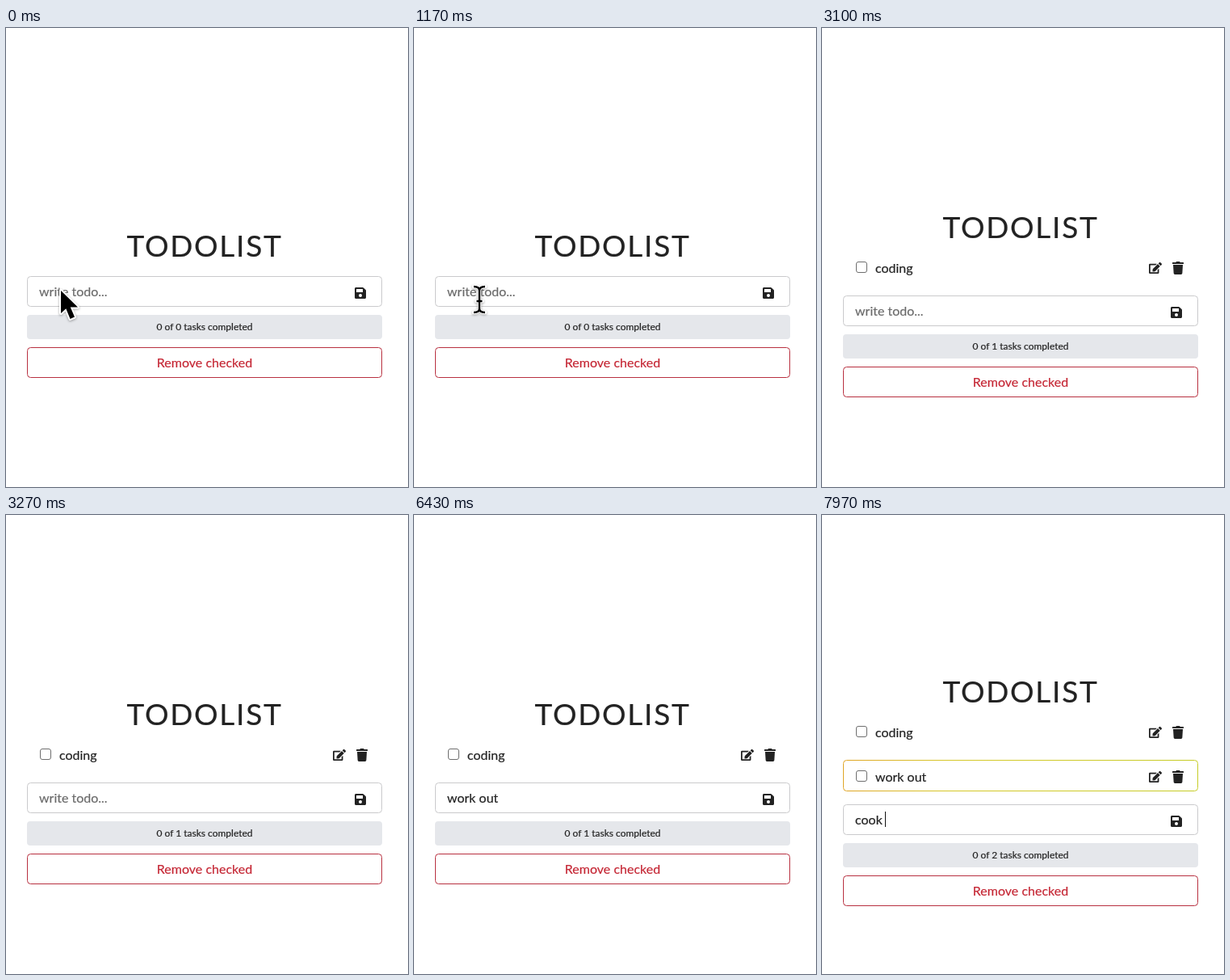
An HTML page that plays this animation: 498 by 568 pixels, repeating every 8 s.

```html
<!DOCTYPE html>
<html lang="en">
<head>
<meta charset="utf-8">
<title>Todolist</title>
<style>
  html, body { margin: 0; width: 100%; height: 100%; overflow: hidden; background: #fff; }
  svg { display: block; }
  text { font: 16px Lato, sans-serif; white-space: pre; fill: #222; stroke: #222; stroke-width: .2px; }
  .title { font-size: 37px; letter-spacing: 1.7px; }
  .small { font-size: 12px; }
  .mid { text-anchor: middle; }
  .hint { fill: #6b6b6b; stroke: #6b6b6b; }
  .red { fill: #c52735; stroke: #c52735; }
  .icon { fill: #222; }
  .line { fill: none; stroke-width: 1px; }
  .halo { fill: none; stroke: #fff; stroke-linejoin: round; stroke-linecap: round; }
  #pointer { filter: drop-shadow(0 1.5px 1.5px rgba(0, 0, 0, .35)); }
</style>
</head>
<body>
<svg width="498" height="568" viewBox="0 0 498 568">
  <defs>
    <linearGradient id="glow">
      <stop offset="0" stop-color="#e0a526"/>
      <stop offset=".3" stop-color="#d6c828"/>
      <stop offset="1" stop-color="#c6cc26"/>
    </linearGradient>
    <path id="save" transform="scale(.03125)" d="M433.9 129.9l-83.8-83.8A48 48 0 0 0 316.1 32H48C21.5 32 0 53.5 0 80v352c0 26.5 21.5 48 48 48h352c26.5 0 48-21.5 48-48V163.9a48 48 0 0 0-14.1-34zM224 416a64 64 0 1 1 0-128a64 64 0 1 1 0 128zM320 111.5V212a12 12 0 0 1-12 12H76a12 12 0 0 1-12-12V108a12 12 0 0 1 12-12h228.5a12 12 0 0 1 8.5 3.5l3.5 3.5a12 12 0 0 1 3.5 8.5z" fill-rule="evenodd"/>
    <path id="trash" transform="scale(.03125)" d="M432 32H312l-9.4-18.7A24 24 0 0 0 281 0H167a24 24 0 0 0-21.5 13.3L136 32H16A16 16 0 0 0 0 48v32a16 16 0 0 0 16 16h416a16 16 0 0 0 16-16V48a16 16 0 0 0-16-16zM53 467a48 48 0 0 0 48 45h246a48 48 0 0 0 48-45L416 128H32z"/>
    <g id="edit" transform="scale(.02778)">
      <path d="M402.6 83.2l90.2 90.2a10 10 0 0 1 0 13.8L274.4 405.6l-92.8 10.3a19.5 19.5 0 0 1-21.5-21.5l10.3-92.8L388.8 83.2a10 10 0 0 1 13.8 0zM564.6 60.3l-48.8-48.8a39 39 0 0 0-55.2 0l-35.4 35.4a10 10 0 0 0 0 13.8l90.2 90.2a10 10 0 0 0 13.8 0l35.4-35.4a39 39 0 0 0 0-55.2z"/>
      <path d="M384 346V448H64V128h230a12 12 0 0 0 8.5-3.5l40-40A12 12 0 0 0 334 64H48A48 48 0 0 0 0 112v352a48 48 0 0 0 48 48h352a48 48 0 0 0 48-48V306a12 12 0 0 0-20.5-8.5l-40 40a12 12 0 0 0-3.5 8.5z"/>
    </g>
    <g id="row">
      <rect class="line" x="42.5" y="-13.5" width="13" height="13" rx="2.5" stroke="#6e6e6e"/>
      <use class="icon" href="#edit" x="0" transform="translate(405 -13.1)"/>
      <use class="icon" href="#trash" transform="translate(434 -14)"/>
    </g>
    <path id="arrow" d="M0 0V28L6.3 22.2L11.5 35L17 32.6L11.8 20.6H21Z"/>
    <path id="beam" d="M-7-16Q0-16 0-11Q0-16 7-16M0-11V11M-7 16Q0 16 0 11Q0 16 7 16M-3.5 2H3.5"/>
  </defs>

  <text id="title" class="title mid" x="246" y="283">TODOLIST</text>

  <g id="first">
    <use href="#row"/>
    <text id="name0" x="66"></text>
  </g>
  <g id="second">
    <rect class="line" x="26.5" y="-26.5" width="439" height="38" rx="4" stroke="url(#glow)"/>
    <use href="#row"/>
    <text id="name1" x="66"></text>
  </g>

  <g id="form">
    <rect class="line" x="26.5" y="307.5" width="439" height="37" rx="4" stroke="#cacacc"/>
    <text id="hint" class="hint" x="41" y="332">write todo...</text>
    <text id="value" x="41" y="332"></text>
    <rect id="caret" y="316" width="1" height="19" fill="#111"/>
    <use class="icon" href="#save" transform="translate(432 320)"/>
    <rect x="26" y="355" width="440" height="30" rx="4" fill="#e5e7eb"/>
    <text id="count" class="small mid" x="246" y="374"></text>
    <rect class="line" x="26.5" y="395.5" width="439" height="37" rx="4" stroke="#b83040"/>
    <text class="red mid" x="246" y="420">Remove checked</text>
  </g>

  <g id="pointer">
    <g id="arrowCursor">
      <use class="halo" href="#arrow" stroke-width="4"/>
      <use href="#arrow"/>
    </g>
    <g id="beamCursor">
      <use class="halo" href="#beam" stroke-width="4.5"/>
      <use href="#beam" fill="none" stroke="#000" stroke-width="2.4"/>
    </g>
  </g>
</svg>
<script>
const LOOP = 8000, CLICK = 1370, BLINK = 500;
const ENTER = '\n';
const keys = [
  [1770, 'c'], [1900, 'o'], [2000, 'd'], [2070, 'i'], [2270, 'n'], [2470, 'g'], [2530, ENTER],
  [5030, 'w'], [5100, 'o'], [5200, 'r'], [5300, 'k'], [5530, ' '],
  [5700, 'o'], [5770, 'u'], [5870, 't'], [6500, ENTER],
  [7400, 'c'], [7500, 'o'], [7630, 'o'], [7700, 'k'], [7870, ' ']
];
// vertical offsets and row baselines by number of todos
const titleShift = [0, -23, -51];
const formShift = [0, 24, 51];
const firstRow = [0, 303, 275];
// pointer path: time, x, y
const path = [[0, 68, 325], [40, 68, 325], [350, 17, 330], [830, 81, 336]];

const $ = id => document.getElementById(id);
const show = (id, on) => $(id).setAttribute('display', on ? 'inline' : 'none');
const move = (id, x, y) => $(id).setAttribute('transform', `translate(${x} ${y})`);
const setText = (id, s) => { if ($(id).textContent !== s) $(id).textContent = s; };
const ease = k => k * k * (3 - 2 * k);

function typed(t) {
  const todos = [];
  let value = '', last = CLICK;
  for (const [at, key] of keys) {
    if (at > t) break;
    if (key === ENTER) {
      todos.push(value);
      value = '';
    } else {
      value += key;
      last = at;
    }
  }
  return { todos, value, last };
}

function pointerAt(t) {
  const i = path.findIndex(p => p[0] > t);
  if (i < 0) return path[path.length - 1].slice(1);
  const [a, b] = [path[i - 1], path[i]];
  const k = ease((t - a[0]) / (b[0] - a[0]));
  return [a[1] + (b[1] - a[1]) * k, a[2] + (b[2] - a[2]) * k];
}

function draw(t) {
  const { todos, value, last } = typed(t);
  const n = todos.length;

  move('title', 0, titleShift[n]);
  move('form', 0, formShift[n]);
  move('first', 0, firstRow[n]);
  move('second', 0, 330);
  show('first', n > 0);
  show('second', n > 1);
  setText('name0', todos[0] || '');
  setText('name1', todos[1] || '');
  setText('count', `0 of ${n} tasks completed`);

  setText('value', value);
  show('hint', !value);
  const width = value ? $('value').getComputedTextLength() : 0;
  $('caret').setAttribute('x', Math.floor(41 + width));
  show('caret', t >= CLICK && Math.floor((t - last) / BLINK) % 2 === 0);

  const [x, y] = pointerAt(t);
  const overInput = t > 350 && x > 26;
  move('pointer', x, y);
  show('pointer', t < keys[0][0]);
  show('arrowCursor', !overInput);
  show('beamCursor', overInput);
}

const start = performance.now();
function tick() {
  draw((performance.now() - start) % LOOP);
  requestAnimationFrame(tick);
}
tick();
</script>
</body>
</html>
```
